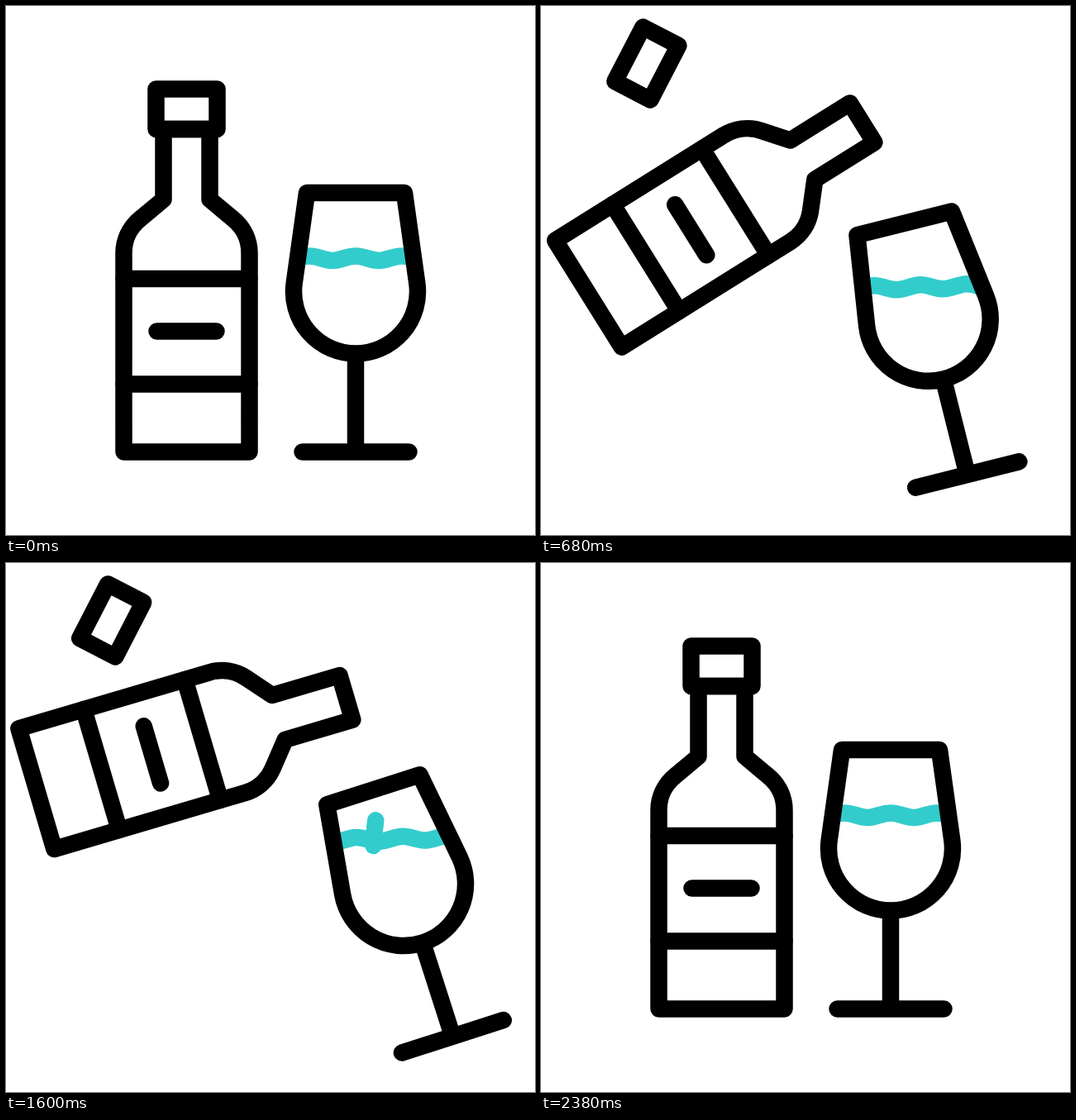
Recreate the animation shown at these times as an HTML page. Size 640x640 px, loop 2400 ms.

```html
<!DOCTYPE html>
<html lang="en">
<head>
<meta charset="utf-8">
<title>Pouring a glass</title>
<style>
  html, body { margin: 0; height: 100%; overflow: hidden; background: #fff; }
  svg { display: block; width: 100vw; height: 100vh; }
  .ink { fill: none; stroke: #000; stroke-width: 20.5; stroke-linecap: round; stroke-linejoin: round; }
  .wine { fill: none; stroke: #3cc; stroke-width: 20.5; stroke-linecap: round; }
</style>
</head>
<body>
<svg viewBox="0 0 640 640">
  <defs>
    <path id="bowl" d="M364 226L348.7 335.3A75 75 0 1 0 497.3 335.3L482 226Z"/>
    <clipPath id="inside"><use id="mask" href="#bowl"/></clipPath>
  </defs>
  <path id="stream" class="wine" pathLength="100" d="M433 190C448 204 454 230 453.5 250C452 285 446 310 444.5 342"/>
  <g clip-path="url(#inside)">
    <path id="wave" class="wine"/>
  </g>
  <g id="glass" class="ink">
    <use href="#bowl"/>
    <path d="M423 421V539.5M358.5 539.5H487.5"/>
  </g>
  <g id="bottle" class="ink">
    <path d="M190.5 149V234L161.6 258.2A53 53 0 0 0 142.5 299V539.5H294.5V299A53 53 0 0 0 275.4 258.2L246.5 234V149Z"/>
    <path d="M142.5 330H294.5M142.5 457.5H294.5M182.5 393.5H254.5"/>
  </g>
  <rect id="cap" class="ink" x="181.5" y="100.5" width="74" height="48.5"/>
</svg>
<script>
const LOOP = 2400;
const $ = id => document.getElementById(id);
const clamp = x => Math.min(1, Math.max(0, x));

// Cubic bezier (k, 0, 1 - k, 1), solved by bisection
function ease(x, k = 0.745) {
  let lo = 0, hi = 1, s = 0.5;
  for (let i = 0; i < 24; i++) {
    s = (lo + hi) / 2;
    const r = 1 - s;
    if (3 * k * s * r * r + 3 * (1 - k) * s * s * r + s ** 3 < x) lo = s; else hi = s;
  }
  return s * s * (3 - 2 * s);
}

const ramp = (t, from, to) => clamp((t - from) / (to - from));
const thereAndBack = (t, a, b, c, d) => ease(ramp(t, a, b)) - ease(ramp(t, c, d));

function place(id, dx, dy, angle, cx, cy) {
  $(id).setAttribute('transform', `translate(${dx} ${dy}) rotate(${angle} ${cx} ${cy})`);
}

$('wave').setAttribute('d', 'M311 302.4c10 0 18 5.5 28 5.5' + 's18-5.5 28-5.5s18 5.5 28 5.5'.repeat(4));

function draw(t) {
  const tilt = thereAndBack(t, 0, 1220, 1220, 2380);
  const pop = thereAndBack(t, 0, 720, 1680, 2380);
  const level = thereAndBack(t, 1060, 1560, 1700, 2060);

  place('bottle', 6.1 * tilt, -142.6 * tilt, 83 * tilt, 218.5, 344.5);
  for (const id of ['glass', 'mask']) place(id, 78.3 * tilt, 46 * tilt, -20.1 * tilt, 423, 382.75);
  place('cap', -90.8 * pop, -55.3 * pop, -62.7 * pop, 218.5, 124.75);
  place('wave', 51.5 * tilt + 11 * level, 50 * tilt - 16 * level, -1.5 * tilt, 423, 305);

  const head = 100 * ramp(t, 1000, 1220), tail = 100 * ramp(t, 1440, 1640);
  const stream = $('stream');
  stream.style.display = head > tail ? '' : 'none';
  stream.style.strokeDasharray = `${head - tail} 300`;
  stream.style.strokeDashoffset = -tail;
}

function frame() {
  draw(performance.now() % LOOP);
  requestAnimationFrame(frame);
}
frame();
</script>
</body>
</html>
```
